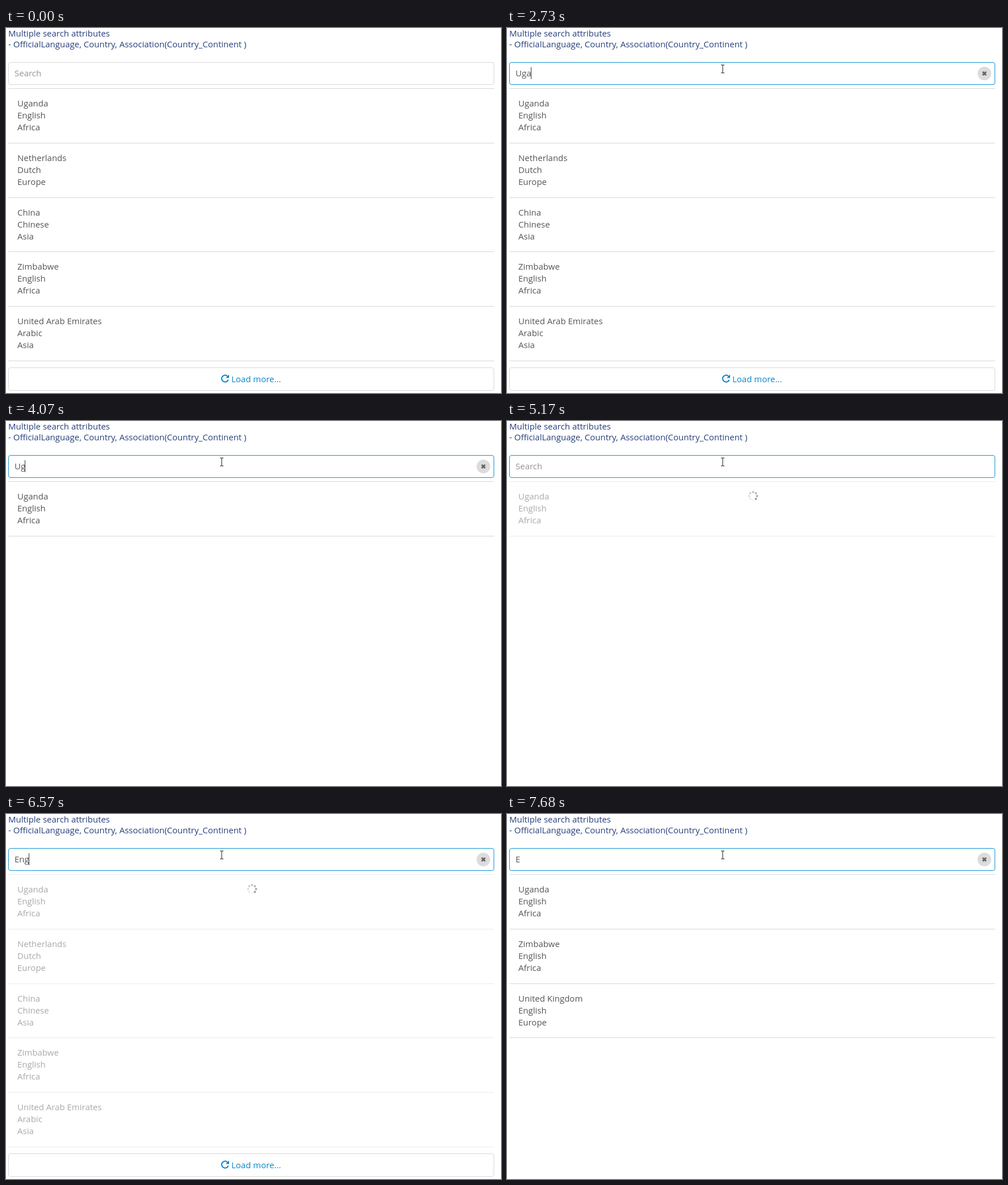
An HTML page that plays this animation: 872 by 642 pixels, repeating every 8 s.

```html
<!DOCTYPE html>
<html lang="en">
<head>
<meta charset="utf-8">
<style>
  html, body { margin: 0; width: 100%; height: 100%; overflow: hidden; background: #fff; }
  svg { display: block; width: 872px; height: 642px; font: 15px "Open Sans", sans-serif; fill: #555; }
  text { white-space: pre; }
</style>
</head>
<body>
<svg viewBox="0 0 872 642" xmlns="http://www.w3.org/2000/svg">
  <g fill="#273f7b">
    <text x="4" y="15">Multiple search attributes</text>
    <text x="4" y="34">- OfficialLanguage, Country, Association(Country_Continent )</text>
  </g>
  <rect id="box" x="4.5" y="60.5" width="855" height="39" rx="3.5" fill="#fff"/>
  <text id="query" x="15" y="85"></text>
  <rect id="caret" y="69" width="1" height="21" fill="#333"/>
  <g id="clear">
    <circle cx="841" cy="80" r="12" fill="#dcdcdc"/>
    <path d="M838 77l6 6m0-6l-6 6" stroke="#666" stroke-width="3"/>
  </g>
  <g id="list"></g>
  <g id="spinner"></g>
  <g id="more">
    <rect x="4.5" y="597.5" width="855" height="40" rx="3.5" fill="#fff" stroke="#d7d7d7"/>
    <path d="M390 612.2A6 6 0 1 0 391.6 618.6" fill="none" stroke="#0a85c7" stroke-width="2"/>
    <path d="M393 609.5v6h-6z" fill="#0a85c7"/>
    <text x="397" y="623" fill="#0a85c7">Load more...</text>
  </g>
  <path id="hand" fill="#fff" stroke="#000" stroke-linejoin="round"
    d="M6.5 13V2.5q0-2 1.5-2t1.5 2V8q2.5-1 3 .8 2.500-.8 3 .8 2.500-.4 2.500 2v4q0 2-1.500 4v2.500h-8.500v-2Q4.500 17 2.500 13q-1.500-2.500 .5-3 1.500 0 3.500 3M9.500 8v3.500m3-2.700v2.700m3-1.900v1.900"/>
  <path id="beam" fill="none" stroke="#111" d="M-3 -7h2q1 0 1 1 0-1 1-1h2M0 -6V6M-3 7h2q1 0 1-1 0 1 1 1h2"/>
</svg>
<script>
const LOOP = 8000, PITCH = 95.8;
const $ = id => document.getElementById(id);

const uganda = "Uganda,English,Africa", zimbabwe = "Zimbabwe,English,Africa";
const lists = {
  all: [uganda, "Netherlands,Dutch,Europe", "China,Chinese,Asia", zimbabwe, "United Arab Emirates,Arabic,Asia"],
  uga: [uganda],
  eng: [uganda, zimbabwe, "United Kingdom,English,Europe"]
};

// Tracks of [start time, value]; each value holds until the next.
const queries = [[0, ""], [2430, "U"], [2660, "Ug"], [2730, "Uga"], [4070, "Ug"], [4240, "U"], [4310, ""],
  [5560, "E"], [5700, "En"], [6040, "Eng"], [7520, "En"], [7600, "E"]];
const carets = [[0, 0], [1200, 1], [1760, 0], [2250, 1], [3210, 0], [3830, 1], [4860, 0], [5330, 1],
  [6650, 0], [7120, 1], [7680, 0]];
const borders = [[0, "#d7d7d7"], [1280, "#6cb9e0"], [1370, "#0f93d2"]];
const results = [[0, "all"], [3520, "uga"], [5480, "all"], [7120, "eng"]];
const loads = [[3130, 3520], [4710, 4930], [5170, 5480], [6570, 7120]];
const pointer = [[0, null], [130, [584, 342]], [200, [505, 220]], [430, [492, 203]], [500, [468, 174]],
  [570, [446, 147]], [640, [429, 124]], [720, [419, 110]], [880, null]];
const beams = [[0, null], [880, [387, 81]], [950, [380, 72]]];

const at = (track, t) => track.reduce((v, [start, next]) => t >= start ? next : v, track[0][1]);
const show = (id, on) => $(id).setAttribute("visibility", on ? "visible" : "hidden");
const place = (id, p) => {
  show(id, p);
  if (p) $(id).setAttribute("transform", `translate(${p})`);
};

const line = i => `<rect x="4" y="${106 + Math.round(i * PITCH)}" width="856" height="1" fill="#d7d7d7"/>`;
const row = (item, i) => item.split(",").map((s, k) =>
  `<text x="20" y="${138 + Math.round(i * PITCH) + 21 * k}">${s}</text>`).join("") + line(i + 1);

$("spinner").innerHTML = Array.from({ length: 8 }, (_, i) => {
  const a = i * Math.PI / 4;
  return `<circle cx="${433.5 + 7 * Math.cos(a)}" cy="${132 + 7 * Math.sin(a)}" r="2"/>`;
}).join("");
const dots = [...$("spinner").children];

let shown;
function draw(t) {
  const text = at(queries, t), name = at(results, t);
  const load = loads.find(([a, b]) => t >= a && t < b);

  if (name !== shown) {
    $("list").innerHTML = line(0) + lists[name].map(row).join("");
    shown = name;
  }
  $("list").setAttribute("opacity", load ? .5 : 1);
  show("more", name === "all");

  show("spinner", load);
  if (load) {
    const head = 1 + Math.floor((t - load[0]) / 78);
    dots.forEach((dot, i) => {
      const age = (head - i + 80) % 8;
      dot.setAttribute("fill", `hsl(0 0% ${62 + age * 5}%)`);
    });
  }

  $("box").setAttribute("stroke", at(borders, t));
  const query = $("query");
  query.textContent = text || "Search";
  query.setAttribute("fill", text ? "#555" : "#949494");
  $("caret").setAttribute("x", text ? Math.floor(14.8 + query.getComputedTextLength()) : 15);
  show("caret", at(carets, t));
  show("clear", text);
  place("hand", at(pointer, t));
  place("beam", at(beams, t));
}

const origin = performance.now();
function tick() {
  draw((performance.now() - origin) % LOOP);
  requestAnimationFrame(tick);
}
tick();
</script>
</body>
</html>
```
